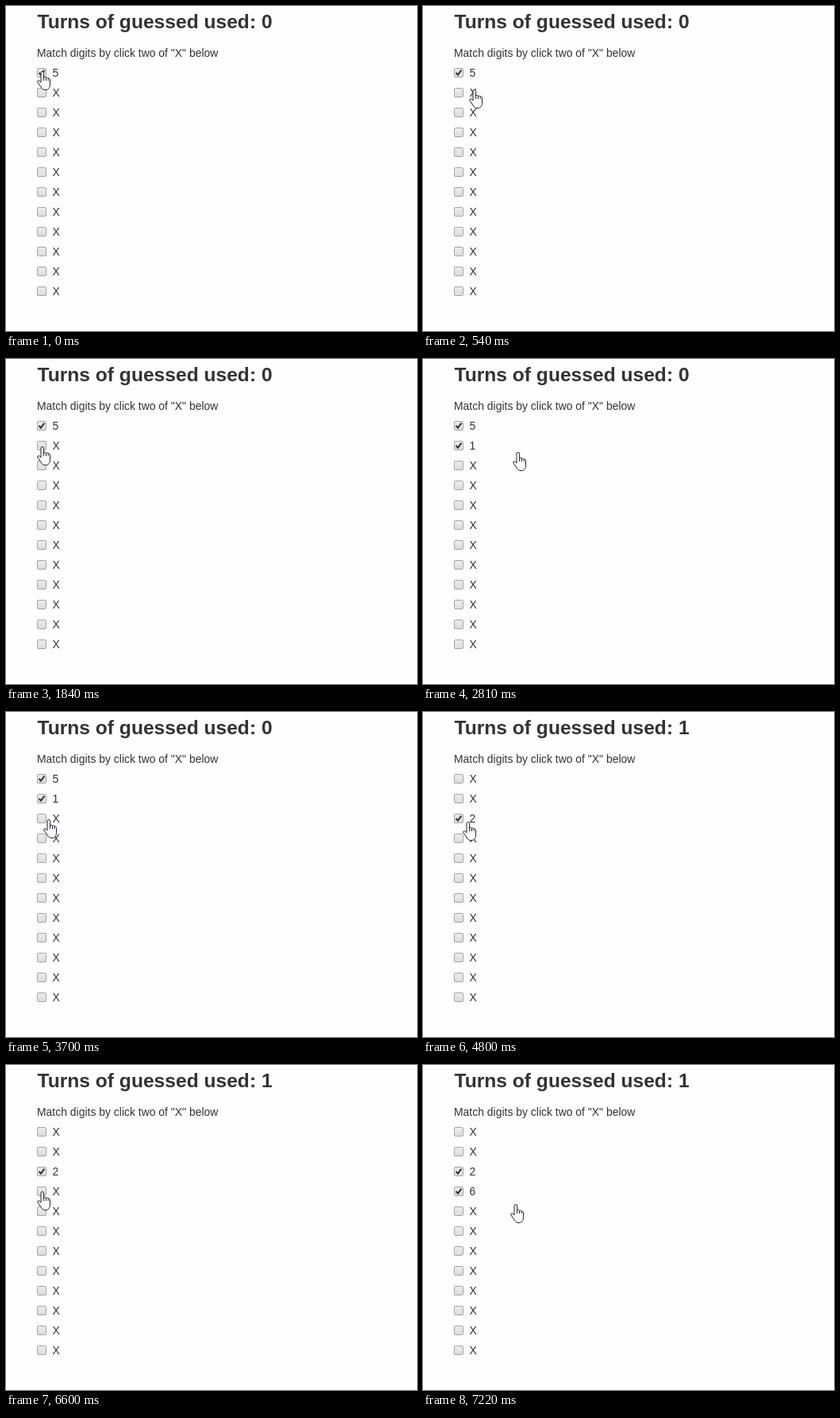
These frames come from a looping animation (518x409 px, 8000 ms). An HTML page:

```html
<!DOCTYPE html>
<html lang="en">
<head>
<meta charset="utf-8">
<title>Match digits</title>
<style>
  html, body { margin: 0; width: 100%; height: 100%; overflow: hidden; background: #fefefe; }
  svg { display: block; }
  text { font: 13.94px "Liberation Sans", Arial, sans-serif; fill: #333; }
  #heading { font-size: 24.6px; font-weight: bold; }
  .box { fill: url(#shade); stroke: #a4a4a4; }
  .tick { fill: none; stroke: #333; stroke-width: 2; }
  .cursor { fill: #fff; stroke: #1c1c2c; stroke-linejoin: round; }
</style>
</head>
<body>
<svg width="518" height="409" viewBox="0 0 518 409">
  <defs>
    <linearGradient id="shade" x2="0" y2="1">
      <stop stop-color="#ededed"/>
      <stop offset="1" stop-color="#dcdcdc"/>
    </linearGradient>
  </defs>
  <text id="heading" x="39.5" y="28"></text>
  <text x="39" y="64">Match digits by click two of "X" below</text>
  <g id="rows"></g>
  <g id="cursor" class="cursor">
    <g id="hand" transform="translate(-6)">
      <path d="M5 14V2.3a1.8 1.8 0 0 1 3.6 0V8c.3-.9 2.6-.7 2.9.5c.5-.8 2.4-.5 2.7.7c.6-.6 2.3-.2 2.3 1.4V16.5C16.5 21 14.5 23.5 11 23.5H10C7.5 23.5 6.3 22 5.2 20L1 14C0 12.2 1.9 11 3.3 12.2Z"/>
      <path d="M8.6 8V12M11.5 8.5V12M14.2 9.2V12"/>
    </g>
    <path id="arrow" d="M.5.7V16.5L4.2 13L6.6 18.5L9 17.5L6.7 12.2H11.6Z"/>
  </g>
</svg>
<script>
const LOOP = 8000, STEP = 120, REVEAL_DELAY = 120;
const ROWS = 12, PITCH = 25, LABEL_TOP = 74, LABEL_HEIGHT = 20;
const $ = id => document.getElementById(id);

// Key points of the pointer's tip; each glide runs in steps of STEP ms.
const home = { x: 45, y: 82 };
const glide = (start, steps, x, y) => ({ start, steps, x, y });
const glides = [
  glide(300, 3, 64, 105),
  glide(680, 3, 108, 115),
  glide(1480, 4, 45, 110),
  glide(2510, 2, 113, 117),
  glide(2810, 1, 119, 117),
  glide(3400, 1, 112, 120),
  glide(3550, 2, 53, 135),
  glide(3850, 2, 44, 137),
  glide(4800, 1, 56, 138),
  glide(4950, 2, 108, 151),
  glide(5220, 2, 126, 153),
  glide(5900, 1, 122, 153),
  glide(6050, 2, 58, 161),
  glide(6330, 1, 52, 161),
  glide(6470, 2, 45, 159),
  glide(6980, 3, 116, 175)
];

// Rows are clicked from the top down.
const clicks = [
  { time: -REVEAL_DELAY, digit: 5 },
  { time: 2120, digit: 1 },
  { time: 4400, digit: 2 },
  { time: 6740, digit: 6 }
];

$('rows').innerHTML = Array.from({ length: ROWS }, (_, i) => `
  <g transform="translate(39 ${LABEL_TOP + 4 + PITCH * i})">
    <rect class="box" x=".5" y=".5" width="11" height="11" rx="1.5"/>
    <path class="tick" d="M2.6 6L5 8.7L9.4 2.6"/>
    <text class="label" x="19.6" y="11"></text>
  </g>`).join('');
const ticks = document.querySelectorAll('.tick');
const labels = document.querySelectorAll('.label');

const smooth = u => u * u * (3 - 2 * u);
const mix = (a, b, u) => a + (b - a) * u;
const show = (el, on) => el.setAttribute('visibility', on ? 'visible' : 'hidden');

function pointerAt(t) {
  const i = glides.findLastIndex(g => g.start <= t);
  if (i < 0) return home;
  const from = glides[i - 1] ?? home, to = glides[i];
  const step = Math.min(to.steps, Math.floor((t - to.start) / STEP) + 1);
  const u = smooth(step / to.steps);
  return { x: mix(from.x, to.x, u), y: mix(from.y, to.y, u) };
}

function drawGame(t) {
  const pressed = clicks.filter(c => c.time <= t).length;
  const revealed = clicks.filter(c => c.time + REVEAL_DELAY <= t).length;
  // A third digit hides the earlier pair and counts a turn.
  const turns = Math.floor((revealed - 1) / 2);
  const first = turns * 2;
  $('heading').textContent = `Turns of guessed used: ${turns}`;
  for (let i = 0; i < ROWS; i++) {
    show(ticks[i], i >= first && i < pressed);
    labels[i].textContent = i >= first && i < revealed ? clicks[i].digit : 'X';
  }
}

function drawPointer(t) {
  const { x, y } = pointerAt(t);
  const overLabel = (y - LABEL_TOP) % PITCH < LABEL_HEIGHT;
  show($('hand'), overLabel);
  show($('arrow'), !overLabel);
  $('cursor').setAttribute('transform', `translate(${Math.round(x)} ${Math.round(y)})`);
}

const start = performance.now();
function frame() {
  const t = (performance.now() - start) % LOOP;
  drawGame(t);
  drawPointer(t);
  requestAnimationFrame(frame);
}
frame();
</script>
</body>
</html>
```
